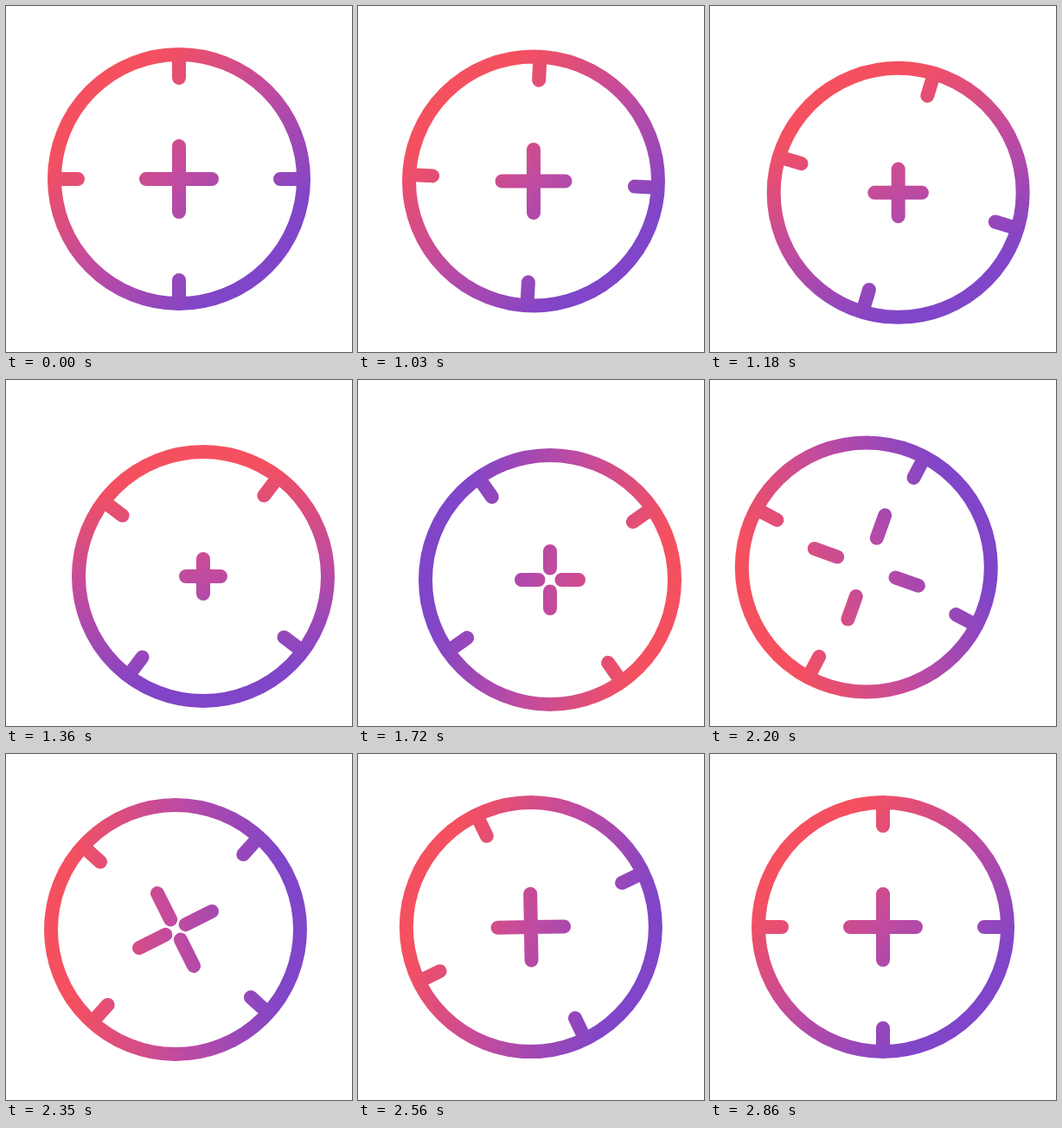
An HTML page with a canvas that plays this animation: 400 by 400 pixels, repeating every 2950 ms.

```html
<!DOCTYPE html>
<html lang="en">
<head>
<meta charset="utf-8">
<title>Crosshair</title>
<style>
html, body { margin: 0; width: 100%; height: 100%; overflow: hidden; background: #fff; }
canvas { display: block; width: 400px; height: 400px; }
</style>
</head>
<body>
<canvas id="stage" width="400" height="400"></canvas>
<script>
const ctx = document.getElementById('stage').getContext('2d');
const LOOP = 2950, START = 1030, END = 2860, STEP = 30;
const RING = 144, TICK = 117, FADE = 122;
const rad = deg => deg * Math.PI / 180;

const times = [1000, 1030, 1360, 1540, 1720, 1840, 1960, 2095, 2350, 2600, 2860];
const tracks = {
  x:     [200, 203, 228, 228, 222, 201, 178.5, 173, 196, 200, 200],
  y:     [200, 202.5, 227, 229, 231, 232, 230, 226, 203, 200, 200],
  ticks: [0, 3, 37, 84, 145, 210, 268, 287, 312, 338, 360],
  tint:  [0, 3, 37, 86, 148, 200, 247, 276, 314, 340, 360],
  gap:   [0, 0, 0, 0, 13.5, 28, 43.4, 46, 13, 0, 0],
  dash:  [38, 36.5, 20, 19.5, 19.5, 20, 21.5, 24, 34, 38, 38],
  cross: [0, 0, 0, 0, 0, 0, 0, 0, 63.4, 90, 90]
};

// Monotone cubic interpolation: smooth, without overshoot
function sample(values, t) {
  const last = times.length - 1;
  const rate = i => (values[i + 1] - values[i]) / (times[i + 1] - times[i]);
  const slope = i => {
    if (i === 0) return rate(0);
    if (i === last) return 0;
    const a = rate(i - 1), b = rate(i);
    return a * b <= 0 ? 0 : 2 * a * b / (a + b);
  };
  let i = 0;
  while (i < last - 1 && t > times[i + 1]) i++;
  const h = times[i + 1] - times[i];
  const u = (t - times[i]) / h, v = 1 - u;
  return v * v * (1 + 2 * u) * values[i] + u * u * (1 + 2 * v) * values[i + 1]
    + h * u * v * (v * slope(i) - u * slope(i + 1));
}

// Four spokes around the centre, a quarter turn apart
function spokes(angle, from, to) {
  for (let k = 0; k < 4; k++) {
    const a = rad(angle + 90 * k), s = Math.sin(a), c = -Math.cos(a);
    ctx.moveTo(s * from, c * from);
    ctx.lineTo(s * to, c * to);
  }
}

function draw(t) {
  const p = {};
  for (const name in tracks) p[name] = sample(tracks[name], t);

  ctx.setTransform(1, 0, 0, 1, 0, 0);
  ctx.fillStyle = '#fff';
  ctx.fillRect(0, 0, 400, 400);
  ctx.translate(p.x, p.y);

  const a = rad(p.tint - 45), gx = FADE * Math.sin(a), gy = -FADE * Math.cos(a);
  const tint = ctx.createLinearGradient(gx, gy, -gx, -gy);
  tint.addColorStop(0, '#f5505f');
  tint.addColorStop(0.5, '#c04ba0');
  tint.addColorStop(1, '#8045c8');

  ctx.strokeStyle = tint;
  ctx.lineWidth = 16;
  ctx.lineCap = 'round';
  ctx.beginPath();
  ctx.arc(0, 0, RING, 0, 2 * Math.PI);
  spokes(p.ticks, RING, TICK);
  spokes(p.cross, p.gap, p.gap + p.dash);
  ctx.stroke();
}

const origin = performance.now();
function frame() {
  const t = (performance.now() - origin) % LOOP;
  const step = START + Math.floor((t - START) / STEP) * STEP;
  draw(t < START ? times[0] : Math.min(step, END));
  requestAnimationFrame(frame);
}
frame();
</script>
</body>
</html>
```
